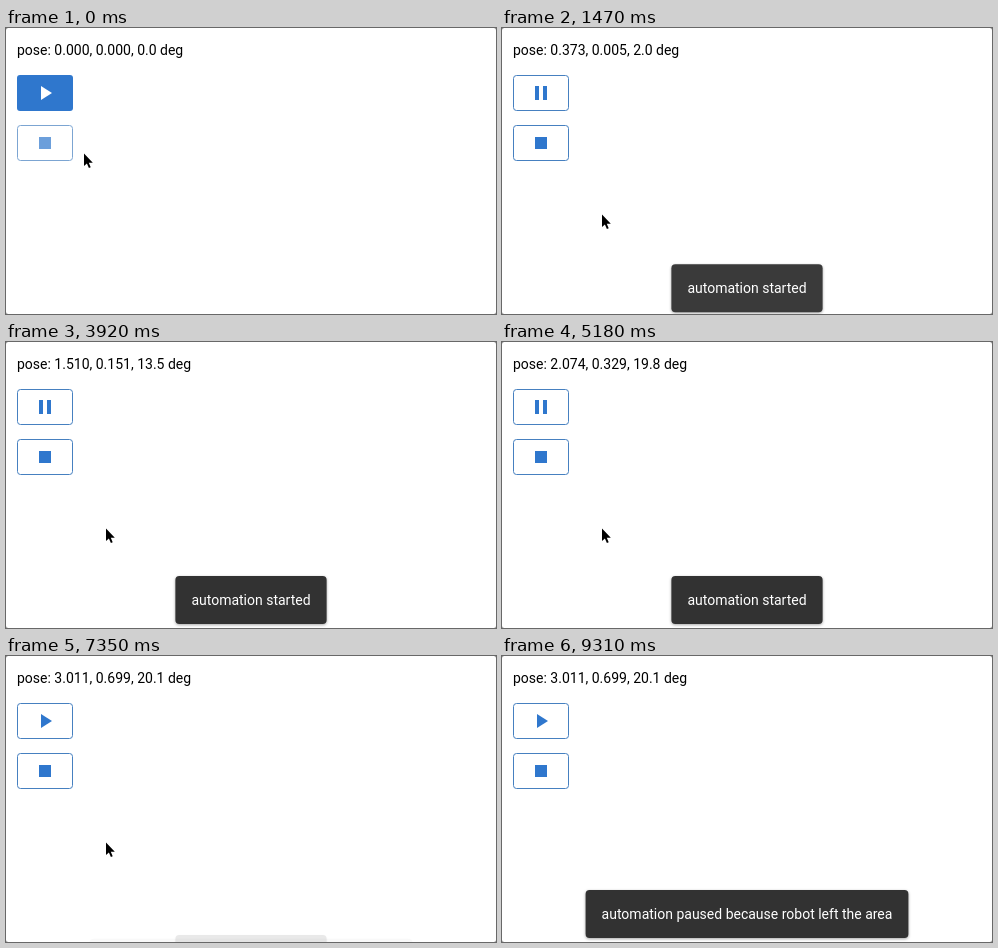
An HTML page that plays this animation: 490x286 px, repeating every 9.52 s.

```html
<!DOCTYPE html>
<html lang="en">
<head>
<meta charset="utf-8">
<title>Automation controls</title>
<style>
  html, body { margin: 0; width: 100%; height: 100%; overflow: hidden; background: #fff; }
  #stage { display: block; width: 490px; height: 286px; background: #8a8a8a;
    font: 14px Roboto, Arial, sans-serif; }
  .line { fill: #fff; stroke: #4680c0; }
  .icon { fill: #2f77cd; }
  .toast rect { fill: #323232; filter: drop-shadow(0 1px 1.5px rgba(0,0,0,.35)); }
  .toast text { fill: #fff; text-anchor: middle; }
</style>
</head>
<body>
<svg id="stage" viewBox="0 0 490 286">
  <rect width="490" height="286" rx="2.5" fill="#fff"/>
  <text id="pose" x="11" y="27"></text>

  <g id="start">
    <rect class="icon" x="11" y="47" width="56" height="36" rx="3"/>
    <rect id="startTint" x="11" y="47" width="56" height="36" rx="3" fill="#fff"/>
    <path d="M35 58v14l11-7z" fill="#fff"/>
  </g>
  <g id="running">
    <rect class="line" x="11.5" y="47.5" width="55" height="35" rx="3"/>
    <path id="pause" class="icon" d="M33 58h4v14h-4zM41 58h4v14h-4z"/>
    <path id="resume" class="icon" d="M35 58v14l11-7z"/>
  </g>
  <g id="stop">
    <rect class="line" x="11.5" y="97.5" width="55" height="35" rx="3"/>
    <rect class="icon" x="33" y="109" width="12" height="12"/>
  </g>

  <g id="left" class="toast">
    <rect y="234" height="48" rx="4"/>
    <text x="245" y="263">automation paused because robot left the area</text>
  </g>
  <g id="started" class="toast">
    <rect y="234" height="48" rx="4"/>
    <text x="245" y="263">automation started</text>
  </g>

  <g id="cursor" stroke-linejoin="round">
    <path id="arrow" d="M0 0V12.5L2.9 9.9L4.9 14.5L6.7 13.7L4.8 9.2H8.8Z" stroke="#fff" stroke-width="1.6" paint-order="stroke"/>
    <path id="hand" d="M-1.6 1C-1.6-.7 1.2-.8 1.4 1L2 5.5C3 4.6 4.6 4.9 4.9 6C5.8 5.3 7.3 5.8 7.6 6.8C8.6 6.3 9.9 7 9.9 8.4L9.6 11.5L8 15.5H.5L-2.5 11.5L-4.6 8.8C-5 7.5-3.4 6.8-2.4 7.6L-.6 9ZM2.2 10.2V13.4M4.5 10.2V13.4M6.8 10.2V13.4" fill="#fff" stroke="#111"/>
  </g>
</svg>
<script>
const LOOP = 9520, FRAME = 70, START = 700, PAUSED = 7310;
const $ = id => document.getElementById(id);
const show = (id, on) => $(id).style.display = on ? '' : 'none';
const clamp = v => Math.min(1, Math.max(0, v));
const mix = (a, b, u) => a + (b - a) * u;

// seconds, x, y, heading: a few poses on the robot's curve
const drive = [
  [.68, 0, 0, 0], [.91, .109, 0, .4], [2.31, .765, .03, 5.4],
  [3.92, 1.51, .151, 13.5], [6.51, 2.659, .56, 22.6], [7.31, 3.011, .699, 20.1]
];

// slope of column c between two neighbouring poses, then at a pose
const secant = (k, c) => (drive[k + 1][c] - drive[k][c]) / (drive[k + 1][0] - drive[k][0]);
function slope(k, c) {
  const last = drive.length - 1;
  if (k === 0) return secant(0, c);
  if (k === last) return secant(last - 1, c);
  const u = (drive[k][0] - drive[k - 1][0]) / (drive[k + 1][0] - drive[k - 1][0]);
  return mix(secant(k - 1, c), secant(k, c), u);
}

function poseAt(t) {
  let k = 0;
  while (k < drive.length - 2 && t >= drive[k + 1][0]) k++;
  const a = drive[k], b = drive[k + 1], d = b[0] - a[0];
  const u = clamp((t - a[0]) / d), w = 1 - u;
  return [1, 2, 3].map(c => Math.abs(
    w * w * (1 + 2 * u) * a[c] + u * u * (3 - 2 * u) * b[c] +
    d * u * w * (w * slope(k, c) - u * slope(k + 1, c))));
}

// pointer: to the play button, down past the stop button, rest, then off the stage
function pointerAt(t) {
  const reach = clamp(t / 420), down = clamp((t - 770) / 630), exit = clamp((t - 8960) / 350);
  if (down === 0) return [mix(78, 50, reach ** 1.5), mix(125.5, 70, reach)];
  return [
    mix(50, 100, down ** 1.5) + 150 * exit ** 1.4,
    mix(70, 186.5, 1 - (1 - down) ** 1.6) + 125 * exit ** 1.4
  ];
}

// the readout skips a refresh about every third step
const beat = n => Math.floor((n - 33.88) / 2.905);
const readoutStep = n => beat(n) > beat(n - 1) ? n - 1 : n;

// CSS "ease": cubic-bezier(.25, .1, .25, 1)
function ease(x) {
  if (x <= 0 || x >= 1) return clamp(x);
  const curve = (s, p, q) => 3 * s * (1 - s) * ((1 - s) * p + s * q) + s ** 3;
  let lo = 0, hi = 1;
  for (let i = 0; i < 24; i++) {
    const mid = (lo + hi) / 2;
    if (curve(mid, .25, .25) < x) lo = mid; else hi = mid;
  }
  return curve(lo, .1, 1);
}

function placeToast(id, amount) {
  const toast = $(id), box = toast.querySelector('rect');
  const width = toast.querySelector('text').getComputedTextLength() + 32;
  box.setAttribute('x', 245 - width / 2);
  box.setAttribute('width', width);
  toast.setAttribute('opacity', amount);
  toast.setAttribute('transform', `translate(0 ${50 * (1 - amount)})`);
}

function draw(time) {
  const n = Math.floor(time / FRAME), t = n * FRAME;

  const [x, y, deg] = poseAt(readoutStep(n) * FRAME / 1000);
  $('pose').textContent = `pose: ${x.toFixed(3)}, ${y.toFixed(3)}, ${deg.toFixed(1)} deg`;

  const begun = t >= START, halted = t >= PAUSED;
  show('start', !begun);
  show('running', begun);
  show('pause', !halted);
  show('resume', halted);
  $('stop').setAttribute('opacity', begun ? 1 : .7);
  $('startTint').setAttribute('opacity', .15 * clamp((t - 350) / 400));

  placeToast('started', ease((t - 730) / 1000) - ease((t - 6730) / 1000));
  placeToast('left', ease((t - PAUSED) / 1000));

  const [px, py] = pointerAt(t);
  const over = px > 11 && px < 67 && (py > 47 && py < 83 || begun && py > 97 && py < 133);
  $('cursor').setAttribute('transform', `translate(${px} ${py})`);
  show('cursor', t < 9310);
  show('hand', over);
  show('arrow', !over);
}

const origin = performance.now();
function tick() {
  draw((performance.now() - origin) % LOOP);
  requestAnimationFrame(tick);
}
tick();
</script>
</body>
</html>
```
